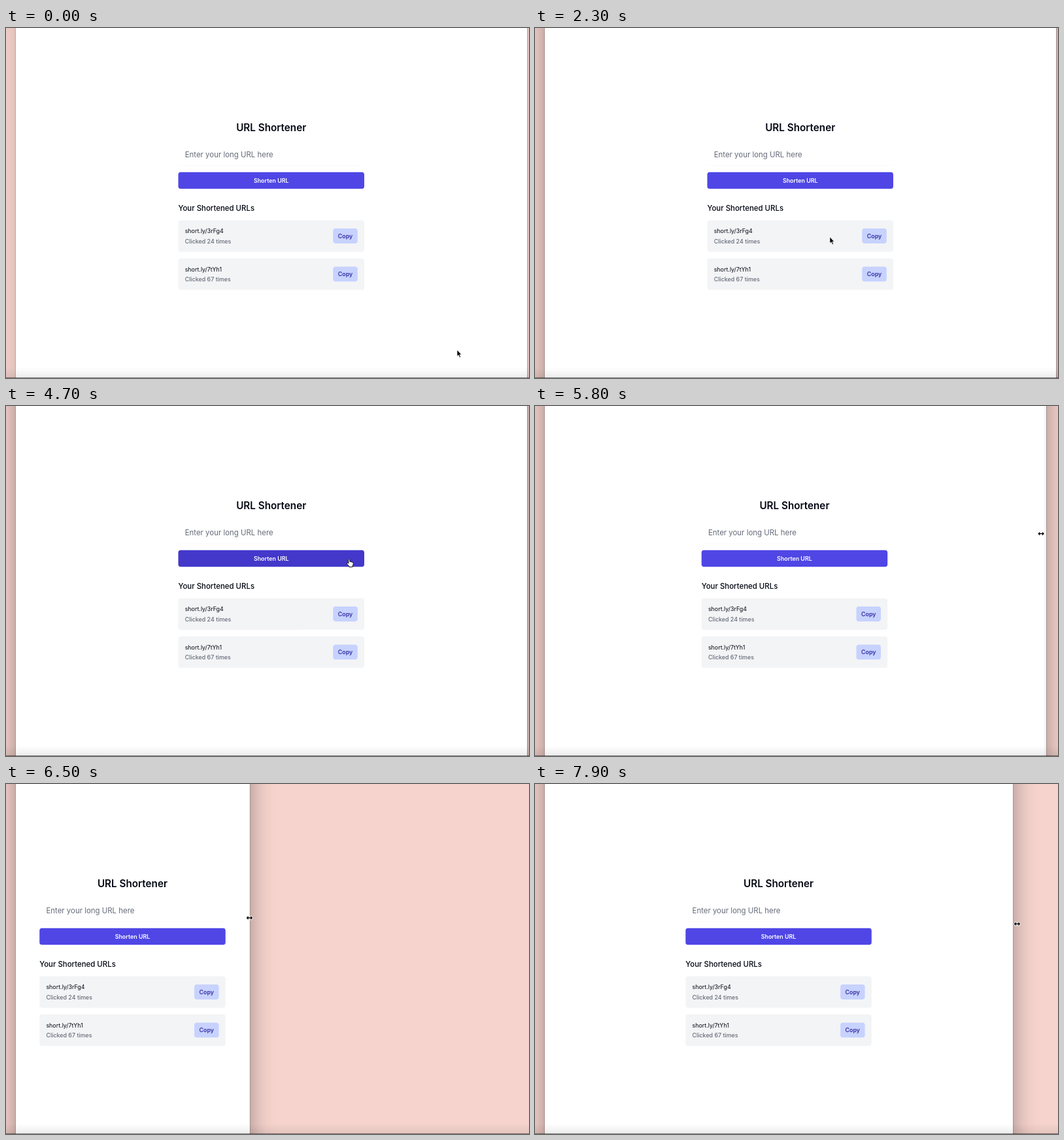
Recreate the animation shown at these times as an HTML page. Size 800x536 px, loop 8000 ms.

```html
<!DOCTYPE html>
<html lang="en">
<head>
<meta charset="utf-8">
<title>URL Shortener</title>
<style>
  html, body { margin: 0; width: 100%; height: 100%; overflow: hidden; background: #f6d3cd; }
  #stage { position: relative; width: 800px; height: 536px; overflow: hidden; }
  #window { position: absolute; left: 15px; top: -60px; height: 640px; }
  #bottom { position: absolute; left: 0; right: 0; bottom: 0; height: 16px;
    background: linear-gradient(transparent, rgba(0,0,0,.07) 15px, rgba(0,0,0,.5) 15px); }
  svg { position: absolute; left: 0; top: 0; }
  text { font: 500 8.89px Inter, sans-serif; font-optical-sizing: none; fill: #030712; }
  .title { font-size: 15.24px; font-weight: 600; }
  .large { font-size: 11.43px; }
  .hint { font-weight: 400; fill: #656b78; }
  .link { font-weight: 400; }
  .clicks { fill: #656b78; }
  .mid { text-anchor: middle; font-weight: 600; }
  .copy { fill: #3730a3; }
</style>
</head>
<body>
<div id="stage">
  <div id="window"></div>
  <div id="bottom"></div>
  <svg width="800" height="536">
    <g id="page">
      <text class="title mid" x="142.2" y="157.6">URL Shortener</text>
      <path d="M1 211H283" stroke="#000" stroke-opacity=".025"/>
      <text class="large hint" x="10.2" y="198">Enter your long URL here</text>
      <rect id="shorten" y="220.8" width="284.5" height="25.4" rx="3.8"/>
      <text class="mid" x="142.2" y="236.7" style="fill:#fff">Shorten URL</text>
      <text class="large" y="279.6">Your Shortened URLs</text>
      <g id="cards"></g>
    </g>
    <g id="cursor" stroke-linejoin="round">
      <path id="arrow" transform="scale(.88)" d="M0 0V11L2.5 8.8L4.4 13.2L6.2 12.4L4.4 8.2H7.6Z" stroke="#fff" stroke-width=".7"/>
      <path id="hand" d="M-1 .8Q0-.6 1 .8L1.6 4Q3 3.2 3.6 4.4Q5 3.8 5.4 5Q6.8 4.8 6.8 6.4Q6.8 9 5.6 10.2V12H.2V10.8Q-1.8 8.8-3.4 6.4Q-3.2 4.6-1.4 5.8L-.4 6.6Z"
        fill="#fff" stroke="#000" stroke-width=".9"/>
      <path id="beam" d="M-2.4-6.5Q0-6.3 0-5V5Q0 6.3-2.4 6.5M2.4-6.5Q0-6.3 0-5V5Q0 6.3 2.4 6.5M-1.2 2H1.2"
        fill="none" stroke="#222" stroke-width=".9"/>
      <path id="resize" d="M-4.8 0L-1.9-2.9V-.8H1.9V-2.9L4.8 0L1.9 2.9V.8H-1.9V2.9Z" stroke="#fff" stroke-width="1.6" paint-order="stroke"/>
    </g>
  </svg>
</div>
<script>
const LOOP = 8000, STEP = 100;
const FOCUS = 1000, GRAB = 5400, DRAG = 5700;
const CARD_PITCH = 58.4;
const $ = id => document.getElementById(id);
const ease = k => k * k * (3 - 2 * k);

$('cards').innerHTML = [['3rFg4', 24], ['7tYh1', 67]].map(([code, clicks], i) => `
  <g transform="translate(0 ${i * CARD_PITCH})">
    <rect y="294.4" width="284.5" height="48.3" rx="3.8" fill="#f3f4f6"/>
    <text class="link" x="10.2" y="314.2">short.ly/${code}</text>
    <text class="clicks" x="10.2" y="329.5">Clicked ${clicks} times</text>
    <rect id="copy${i}" x="236.8" y="307" width="37.5" height="22.9" rx="3.8"/>
    <text class="mid copy" x="255.5" y="321.8">Copy</text>
  </g>`).join('');

// start, end, target x, target y, sideways bend
const moves = [
  [0, 200, 750, 366],          // wander in
  [400, 800, 389, 202],        // URL field
  [1100, 1700, 450, 235, 140], // around to the main button
  [1900, 2300, 451, 320],      // first card
  [2500, 2800, 297, 327],      // its click count
  [2900, 3500, 530, 319],      // first copy button
  [3600, 4000, 528, 379],      // second copy button
  [4100, 4700, 524.5, 234.5, 90],
  [4800, GRAB, 797, 195],      // window edge
  [DRAG, 6410, 372.5, 205],    // drag narrower
  [6800, 8270, 806, 216]       // drag wider
];

function pointer(time) {
  let x = 690, y = 493;
  for (const [start, end, toX, toY, bend = 0] of moves) {
    if (time <= start) break;
    const k = ease(Math.min(1, (time - start) / (end - start)));
    const dx = toX - x, dy = toY - y;
    const side = bend * Math.sin(Math.PI * k) / Math.hypot(dx, dy);
    x += dx * k - dy * side;
    y += dy * k + dx * side;
  }
  return [x, y];
}

function draw(time) {
  const [x, y] = pointer(time);
  // The window edge trails the pointer; the page never exceeds the window.
  const edge = time < DRAG ? 797 : pointer(time - 20)[0];
  const pageEdge = time < DRAG ? 797 : Math.min(edge, pointer(time - 13)[0]);
  const left = (pageEdge + 14.5) / 2 - 142.25;

  const resizing = time >= GRAB;
  const over = (x0, y0, w, h) => !resizing && x >= left + x0 && x <= left + x0 + w && y >= y0 && y <= y0 + h;
  const shorten = over(0, 221, 284, 25);
  const copies = [0, 1].map(i => over(237, 307 + i * CARD_PITCH, 37, 23));
  const onText = over(0, 180, 284, 31) || over(10, 321, 71, 11);

  const frame = $('window').style;
  frame.width = edge - 15 + 'px';
  frame.background = `linear-gradient(90deg, #fff ${pageEdge - 15}px, #f3f4f6 0)`;
  frame.boxShadow = `0 0 0 .6px rgba(0,0,0,.25), 0 8px 34px rgba(0,0,0,${time < FOCUS ? .16 : .37})`;
  $('page').setAttribute('transform', `translate(${left} 0)`);
  $('shorten').setAttribute('fill', shorten ? '#4338ca' : '#4f46e5');
  copies.forEach((hover, i) => $('copy' + i).setAttribute('fill', hover ? '#a5b4fc' : '#c7d2fe'));

  const shape = resizing ? 'resize' : shorten || copies.includes(true) ? 'hand' : onText ? 'beam' : 'arrow';
  for (const id of ['arrow', 'hand', 'beam', 'resize']) $(id).style.display = id === shape ? '' : 'none';
  $('cursor').setAttribute('transform', `translate(${x} ${y})`);
}

const start = performance.now();
function tick() {
  const time = (performance.now() - start) % LOOP;
  draw(Math.floor(time / STEP) * STEP);
  requestAnimationFrame(tick);
}
tick();
</script>
</body>
</html>
```
